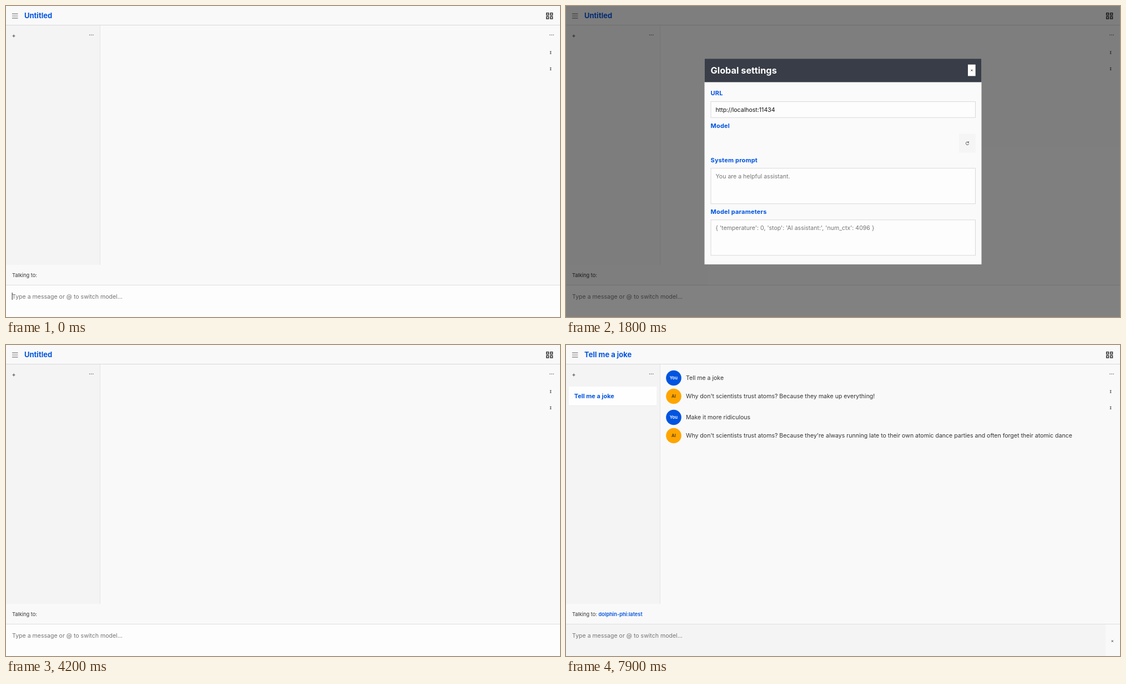
Write an HTML page that moves like this. It is 998x561 px and loops after 8 s.

```html
<!DOCTYPE html>
<html lang="en">
<head>
<meta charset="utf-8">
<title>Chat demo</title>
<style>
  html, body { margin: 0; width: 100%; height: 100%; overflow: hidden; background: #f9f9f9; }
  svg { display: block; width: 998px; height: 561px; font-family: Inter, sans-serif; }
  text { white-space: pre; }
</style>
</head>
<body>
<svg id="stage" viewBox="0 0 998 561" xmlns="http://www.w3.org/2000/svg"></svg>
<script>
const BLUE = '#0054e0', INK = '#333', HINT = '#757575', BODY = 10.56;
const LOOP = 8000, STEP = 100;
const HINT_TEXT = 'Type a message or @ to switch model...';
const URL_TEXT = 'http://localhost:11434';
const ASK = ['Tell me a joke', 'Make it more ridiculous'];
const REPLY = [
  "Why don't scientists trust atoms? Because they make up everything!",
  "Why don't scientists trust atoms? Because they're always running late to their own atomic dance parties and often forget their atomic dance"
];
const stage = document.getElementById('stage');

// --- markup helpers; y is the middle of the capital letters ---
const rect = (x, y, w, h, fill, more = '') =>
  `<rect x="${x}" y="${y}" width="${w}" height="${h}" fill="${fill}" ${more}/>`;
const text = (x, y, s, { size = BODY, fill = INK, weight = 400, more = '' } = {}) =>
  `<text x="${x}" y="${(y + size * 0.36).toFixed(2)}" font-size="${size}" font-weight="${weight}" fill="${fill}" ${more}>${s}</text>`;
const path = (d, stroke, width, more = '') =>
  `<path d="${d}" fill="none" stroke="${stroke}" stroke-width="${width}" ${more}/>`;
const group = (id, inner) => `<g id="${id}">${inner}</g>`;
const dots = (x, y) => [0, 3, 6].map(d => rect(x + d, y, 1.4, 1.4, '#666')).join('');
const cross = (x, y, r) =>
  path(`M${x - r} ${y - r}l${2 * r} ${2 * r}m0 ${-2 * r}l${-2 * r} ${2 * r}`, '#333', 0.9);
const label = (y, s) =>
  text(260.5, y, s, { size: 11, weight: 700, fill: BLUE, more: 'letter-spacing=".2"' });
const field = (y, h) => rect(261, y, 476.5, h, '#fdfdfd', 'stroke="#d9d9d9"');

function avatar(y, name, fill, ink) {
  return `<circle cx="194" cy="${y}" r="13.8" fill="${fill}"/>` +
    text(194, y, name, { size: 7.8, weight: 600, fill: ink, more: 'text-anchor="middle"' });
}

function turn(i) {
  const y = 59.5 + 71 * i;
  return group('ask' + i, avatar(y, 'You', BLUE, '#fff') + text(216, y, ASK[i])) +
    group('reply' + i, avatar(y + 33, 'AI', '#ffa500', '#4a3a14') +
      text(216, y + 33, '', { more: `id="words${i}"` }));
}

function page() {
  const arrows = y => path(`M979.8 ${y - 2}h2.6m-1.3 0v4m-1.3 0h2.6`, '#444', 1);
  const tiles = [[973.7, 12.7], [980.7, 12.7], [973.7, 19.2], [980.7, 19.2]]
    .map(([x, y]) => rect(x, y, 3.8, 3.8, 'none', 'stroke="#333" stroke-width="1.5"')).join('');
  return rect(0, 0, 998, 561, '#f9f9f9') +
    rect(0, 35, 169, 432, '#f4f4f4') +
    path('M169.5 35V467', '#e4e4e4', 1) +
    rect(961, 0, 37, 34, '#fdfdfd', 'id="hover"') +
    path('M0 34.5H998', '#d9d9d9', 1) +
    path('M11 14.2h10.5M11 18h10.5M11 21.8h10.5', '#777', 1.2) +
    text(33, 17.3, '', { size: 13, weight: 700, fill: BLUE, more: 'id="title"' }) +
    tiles +
    path('M11.5 54h5M14 51.5v5', '#444', 1) +
    dots(150, 51.6) + dots(979.3, 51.6) + arrows(84) + arrows(113.3) +
    group('session', rect(5, 76, 158.5, 34, '#ebebeb') + rect(5, 75, 158.5, 34, '#fefefe') +
      text(14.7, 91.7, '', { size: 11, weight: 700, fill: BLUE, more: 'id="name"' })) +
    turn(0) + turn(1) +
    text(11, 485.5, 'Talking to:', { size: 9.24 }) +
    text(58.6, 485.5, 'dolphin-phi:latest', { size: 9.24, weight: 600, fill: BLUE, more: 'id="talking"' }) +
    rect(0, 504, 998, 57, '#fdfdfd', 'id="bar"') +
    path('M0 503.5H998', '#dedede', 1) +
    group('stop', rect(972, 504, 26, 57, '#f9f9f9') + cross(984.3, 534.2, 1.6)) +
    text(11, 523.8, '', { more: 'id="prompt"' }) +
    rect(0, 517, 1, 13, '#222', 'id="caret"');
}

function shade() {
  return group('dim', rect(170, 35, 828, 469, '#000') + rect(0, 0, 998, 35, '#000') +
      rect(0, 467, 170, 37, '#000')) +
    rect(0, 35, 170, 432, '#000', 'id="dimSide"') +
    rect(0, 504, 998, 57, '#000', 'id="dimBar"') +
    path('M0 34.5H998', '#e6e6e6', 1, 'id="edge"');
}

// Laid out from the top of the dialog; "lower" slides down when the list fills.
function dialog() {
  const models = text(269.5, 150, 'deepseek-coder:6.7b-base') +
    group('picked', rect(261, 167, 448, 29, '#f1f1f1') + rect(261, 166, 448, 29, '#fefefe') +
      text(269.5, 180, 'dolphin-phi:latest',
        { size: 11, weight: 700, fill: BLUE, more: 'letter-spacing=".3"' })) +
    group('plain', text(269.5, 180, 'dolphin-phi:latest')) +
    text(269.5, 210, 'phi:latest');
  const refresh = rect(708, -17, 30, 34, '#f5f5f5', 'id="press"') +
    path('M725.1 -1.6A2.7 2.7 0 1 0 725.7 .7M725.4 -3.4v2.1h-2.1', '#444', 0.9);
  return group('dialog', rect(249.5, 0, 499, 371, '#fafafa', 'id="panel"') +
    group('content',
      rect(249.5, 0, 499, 42.3, '#383d47') +
      text(260.5, 21.3, 'Global settings', { size: 16.3, weight: 700, fill: '#fff' }) +
      rect(724, 10.5, 13.7, 20.7, '#fdfdfd') + cross(730.9, 21, 1.5) +
      label(62.3, 'URL') + field(77.3, 28.8) + text(269.5, 91.8, '', { more: 'id="url"' }) +
      label(120.6, 'Model') + group('models', models) + group('refresh', refresh) +
      group('lower',
        label(183, 'System prompt') + field(197.6, 64) +
        text(269.5, 212.3, 'You are a helpful assistant.', { fill: HINT }) +
        label(276, 'Model parameters') + field(290.7, 64) +
        text(269.5, 305.3, "{ 'temperature': 0, 'stop': 'AI assistant:', 'num_ctx': 4096 }", { fill: HINT }))));
}

stage.innerHTML = page() + shade() + dialog();
const el = {};
stage.querySelectorAll('[id]').forEach(n => { el[n.id] = n; });

// --- state helpers ---
const clamp = v => Math.max(0, Math.min(1, v));
const during = (t, a, b) => t >= a && t < b;
const show = (id, on) => { el[id].style.display = on ? '' : 'none'; };
const fade = (id, v) => el[id].setAttribute('opacity', v);
const shift = (id, y) => el[id].setAttribute('transform', `translate(0 ${y})`);
const write = (id, s, fill) => {
  el[id].textContent = s;
  if (fill) el[id].setAttribute('fill', fill);
};
const typed = (s, t, a, b) => s.slice(0, Math.round(s.length * clamp((t - a) / (b - a))));
const words = (s, n) => s.split(' ').slice(0, Math.max(0, n)).join(' ');

function drawDialog(t) {
  const closing = t >= 3000;
  const p = closing ? clamp(0.95 - (t - 3100) * 0.00275) : clamp((t - 600) / 500);
  const full = t >= 1900;
  const height = full ? 427 : 371;
  const scale = closing ? 1 - 0.031 * (1 - p) : 0.895 + 0.105 * p;
  const dim = 0.49 * p;

  fade('dim', dim);
  fade('dimSide', closing ? dim * 0.68 : dim);
  fade('dimBar', closing ? 0 : dim);
  show('edge', during(t, 3100, 3300));

  show('dialog', p > 0);
  fade('panel', clamp(p * 2.5));
  fade('content', p);
  el.panel.setAttribute('height', height);
  el.dialog.setAttribute('transform',
    `translate(499 280.6) scale(${scale}) translate(-499 ${-height / 2})`);

  const url = typed(URL_TEXT, t, 1200, 1700);
  write('url', url || 'Example: ' + URL_TEXT, url ? '#111' : HINT);
  show('models', full);
  show('picked', t >= 2400);
  show('plain', t < 2400);
  show('press', during(t, 1700, 1900));
  shift('refresh', full ? 180.5 : 152.5);
  shift('lower', full ? 56 : 0);
}

function drawChat(t) {
  const first = typed(ASK[0], t, 4550, 5200);
  write('title', first || 'Untitled');
  write('name', first);
  show('session', first);
  show('talking', first);
  show('hover', during(t, 400, 1100));

  const sent = [5800, 7200];
  const count = [Math.floor((t - 5900) / 40) + (t >= 5900 ? 1 : 0), 22 - Math.ceil((7900 - t) * 0.03)];
  sent.forEach((at, i) => {
    show('ask' + i, t >= at);
    show('reply' + i, count[i] > 0);
    write('words' + i, words(REPLY[i], count[i]));
  });

  const busy = during(t, 5800, 6400) || t >= 7200;
  el.bar.setAttribute('fill', busy ? '#f4f4f4' : '#fdfdfd');
  show('stop', busy);

  let draft = '';
  if (t < sent[0]) draft = first;
  else if (during(t, 7000, sent[1])) draft = typed(ASK[1], t, 6900, 7100);
  write('prompt', draft || HINT_TEXT, draft ? '#111' : HINT);
  show('caret', t < 500 || draft || during(t, 6400, 7000));
  el.caret.setAttribute('x', draft ? 10.6 + el.prompt.getComputedTextLength() : 10.7);
}

function draw(ms) {
  const t = Math.floor((ms % LOOP) / STEP) * STEP;
  drawDialog(t);
  drawChat(t);
}

const start = performance.now();
function tick() {
  draw(performance.now() - start);
  requestAnimationFrame(tick);
}
tick();
</script>
</body>
</html>
```
